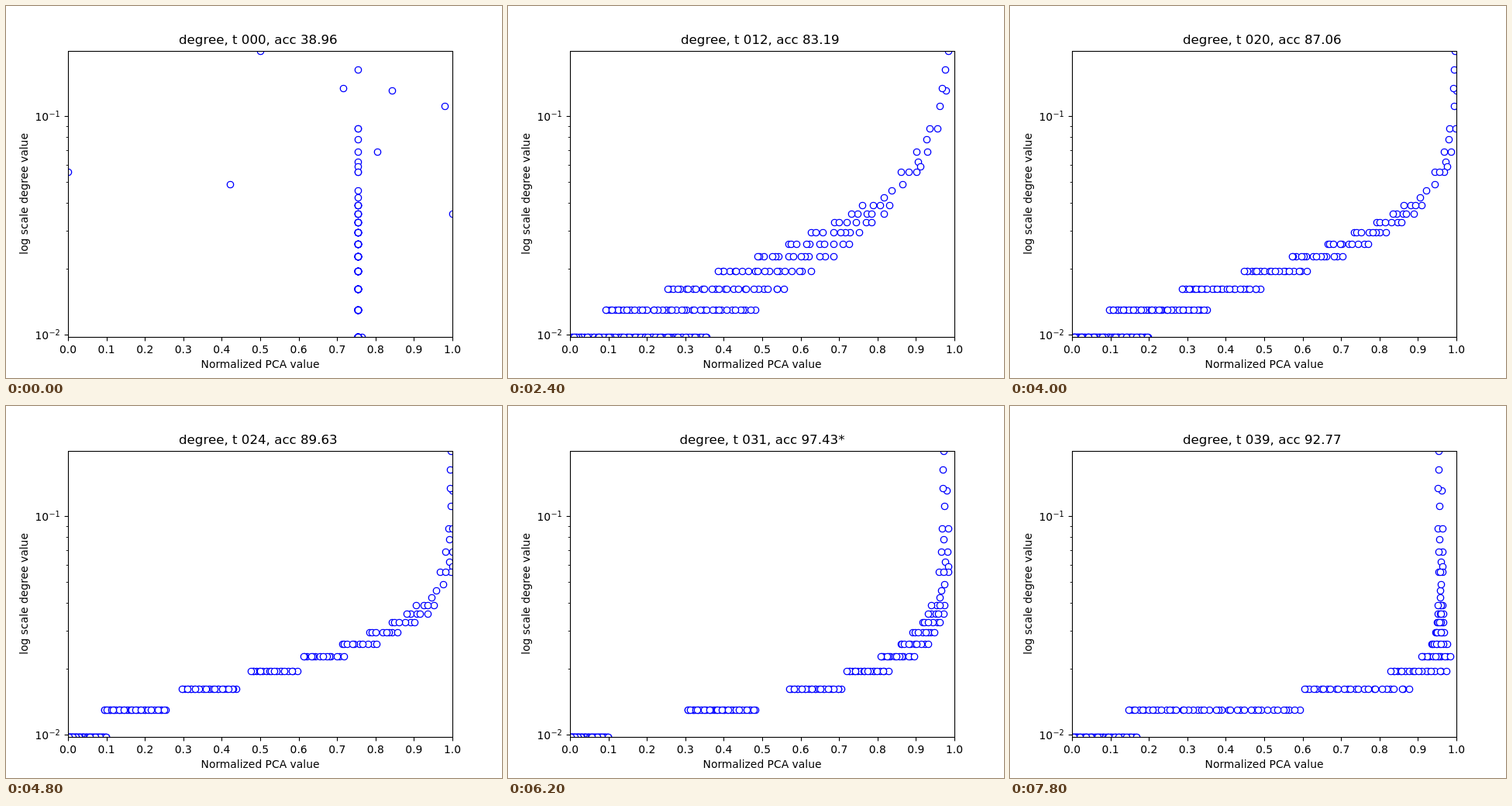
An HTML page with a canvas that plays this animation: 640x480 px, repeating every 8000 ms.

```html
<!DOCTYPE html>
<html lang="en">
<head>
<meta charset="utf-8">
<title>Degree against normalized PCA value</title>
<style>
  html, body { margin: 0; width: 100%; height: 100%; overflow: hidden; background: #fff; }
  canvas { display: block; }
</style>
</head>
<body>
<canvas id="plot" width="640" height="480"></canvas>
<script>
const ctx = document.getElementById("plot").getContext("2d");
const STEP_MS = 200, STEPS = 40;
const LEFT = 80, RIGHT = 576, TOP = 58, BOTTOM = 427, CENTER = 328;
const NODES = 307, MIN_DEGREE = 3, MAX_DEGREE = 61;

// Before training nearly every node shares one value, except a few.
const START_X = 0.754, START_ACC = 38.96;
const START_OUTLIERS = { 3: 0.765, 11: 1, 15: 0.422, 17: 0, 21: 0.805, 34: 0.98, 40: 0.843, 41: 0.716, 61: 0.5 };

// Shape of the cloud: x rises from base to top along a Weibull curve of log degree.
const STAGES = [
  { step: 7, acc: 84.40, base: 0.13, top: 1, scale: 0.49, shape: 1.25, spread: 0.15, taper: 1.3 },
  { step: 12, acc: 83.19, base: 0.18, top: 1, scale: 0.48, shape: 1.45, spread: 0.23, taper: 1.3 },
  { step: 16, acc: 84.49, base: 0.15, top: 1, scale: 0.42, shape: 1.49, spread: 0.2, taper: 1.3 },
  { step: 24, acc: 89.63, base: 0.05, top: 1, scale: 0.36, shape: 1.85, spread: 0.08, taper: 0.5 },
  { step: 31, acc: 97.43, base: 0.05, top: 0.976, scale: 0.22, shape: 1.35, spread: 0.105, taper: 0.5 },
  { step: 39, acc: 92.77, base: 0.085, top: 0.958, scale: 0.19, shape: 2.2, spread: 0.27, taper: 0.5 }
];
const BEST = Math.max(...STAGES.map(stage => stage.acc));

const lerp = (a, b, f) => a + (b - a) * f;
const snap = v => Math.round(v) + 0.5;
const logDegree = degree => Math.log10(degree / MIN_DEGREE);
const degreeY = degree => 427.2 - 369.6 * logDegree(degree) / logDegree(MAX_DEGREE);
const valueX = value => LEFT + value * (RIGHT - LEFT);

let seed = 20;
function random() {
  seed = (seed * 1664525 + 1013904223) % 4294967296;
  return seed / 4294967296;
}

const nodes = [];

function addNodes(degree, count) {
  for (let i = 0; i < count; i++) {
    const rank = (i + random()) / count;
    nodes.push({
      level: logDegree(degree),
      y: snap(degreeY(degree)),
      start: i === 0 ? START_OUTLIERS[degree] ?? START_X : START_X,
      offset: 2 * rank ** 1.2 - 1,
      order: random()
    });
  }
}

// Common degrees follow a power law; the hubs are few.
for (let degree = MIN_DEGREE; degree <= 12; degree++) {
  addNodes(degree, Math.round(80 * (MIN_DEGREE / degree) ** 2.1));
}
for (const degree of [13, 14, 15, 18, 19, 24, 34, 40, 41, 50, 61]) addNodes(degree, 1);
for (const degree of [21, 27]) addNodes(degree, 2);
addNodes(17, 3);
nodes.sort((a, b) => a.order - b.order);

function cloudValue(node, stage) {
  const rise = 1 - Math.exp(-((node.level / stage.scale) ** stage.shape));
  const middle = lerp(stage.base, stage.top, rise);
  const reach = Math.min(middle, stage.spread * (1 - rise) ** stage.taper + 0.007);
  return Math.min(1, middle + reach * node.offset);
}

function stageAt(step) {
  const next = STAGES.findIndex(stage => stage.step >= step);
  const to = STAGES[next], from = STAGES[next - 1] ?? to;
  const f = from === to ? 0 : (step - from.step) / (to.step - from.step);
  return Object.fromEntries(Object.keys(to).map(key => [key, lerp(from[key], to[key], f)]));
}

function text(content, x, y, size = 13.89, align = "center") {
  ctx.font = `${size}px "DejaVu Sans", sans-serif`;
  ctx.textAlign = align;
  ctx.fillText(content, x, y);
}

function line(x1, y1, x2, y2, width) {
  ctx.lineWidth = width;
  ctx.beginPath();
  ctx.moveTo(x1, y1);
  ctx.lineTo(x2, y2);
  ctx.stroke();
}

function drawMarkers(stage, learned) {
  ctx.save();
  ctx.beginPath();
  ctx.rect(LEFT, TOP, RIGHT - LEFT, BOTTOM - TOP);
  ctx.clip();
  ctx.fillStyle = "#fff";
  ctx.strokeStyle = "#00f";
  ctx.lineWidth = 1.39;
  for (const node of nodes) {
    const value = lerp(node.start, cloudValue(node, stage), learned);
    ctx.beginPath();
    ctx.arc(snap(valueX(value)), node.y, 4.17, 0, 2 * Math.PI);
    ctx.fill();
    ctx.stroke();
  }
  ctx.restore();
}

function drawAxes() {
  ctx.fillStyle = ctx.strokeStyle = "#000";
  for (let i = 0; i <= 10; i++) {
    const x = valueX(i / 10);
    line(snap(x), BOTTOM + 0.5, snap(x), BOTTOM + 5.4, 1.11);
    text((i / 10).toFixed(1), x, 448);
  }
  for (const exponent of [1, 2]) {
    const y = snap(degreeY(NODES / 10 ** exponent));
    line(LEFT + 0.5, y, LEFT - 4.4, y, 1.11);
    text("10", 37.5, y + 5.5, 13.89, "left");
    text("\u2212" + exponent, 55.4, y + 0.5, 9.72, "left");
  }
  for (let i = 2; i <= 9; i++) {
    const y = snap(degreeY(NODES * i / 100));
    line(LEFT + 0.5, y, LEFT - 2.3, y, 0.83);
  }
  ctx.lineWidth = 1.11;
  ctx.strokeRect(LEFT + 0.5, TOP + 0.5, RIGHT - LEFT, BOTTOM - TOP);
  text("Normalized PCA value", CENTER, 467);
  ctx.save();
  ctx.translate(28, 242.4);
  ctx.rotate(-Math.PI / 2);
  text("log scale degree value", 0, 0);
  ctx.restore();
}

function draw(step) {
  const stage = stageAt(step);
  const learned = 1 - (1 - Math.min(1, step / STAGES[0].step)) ** 2;
  const acc = lerp(START_ACC, stage.acc, learned);
  const mark = acc === BEST ? "*" : " ";

  ctx.fillStyle = "#fff";
  ctx.fillRect(0, 0, 640, 480);
  drawMarkers(stage, learned);
  drawAxes();
  text(`degree, t ${String(step).padStart(3, "0")}, acc ${acc.toFixed(2)}${mark}`, CENTER, 49, 16.67);
}

function frame() {
  draw(Math.floor(performance.now() / STEP_MS) % STEPS);
  requestAnimationFrame(frame);
}
frame();
</script>
</body>
</html>
```
